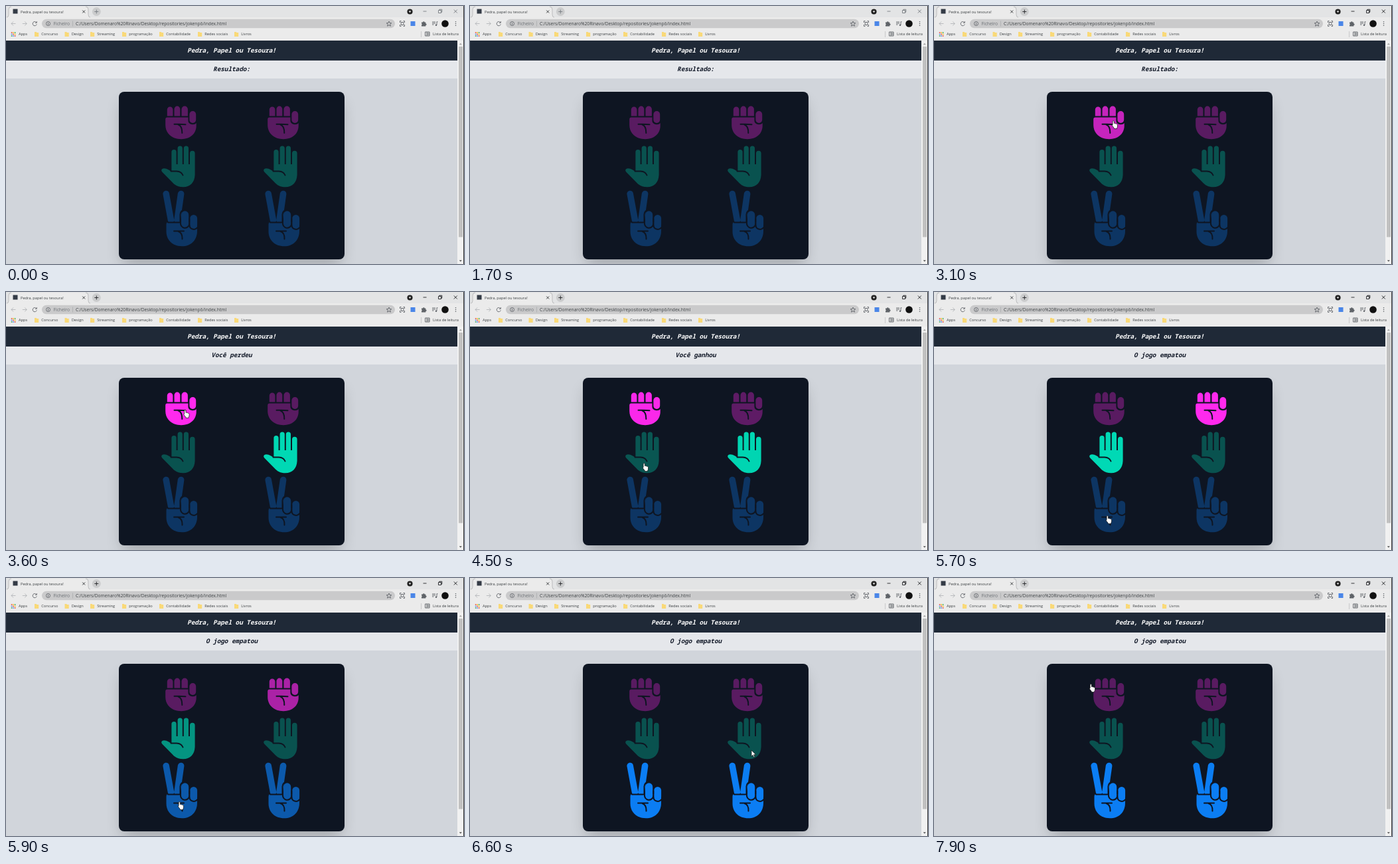
These frames come from a looping animation (690 by 388 pixels, 8 s). An HTML page:

```html
<!DOCTYPE html>
<html lang="pt">
<head>
<meta charset="utf-8">
<title>Pedra, papel ou tesoura!</title>
<style>
  html, body { margin: 0; width: 100%; height: 100%; overflow: hidden; background: #d1d5db; }
  svg { display: block; width: 100vw; height: 100vh; }
  .ui { font-family: "Open Sans", "Noto Sans", sans-serif; font-size: 5.7px; fill: #3c4043; }
  .url { font-size: 6.69px; }
  .mono { font: italic 600 9.3px "Noto Sans Mono", "DejaVu Sans Mono", monospace; text-anchor: middle; }
  .line { fill: none; stroke: #5f6368; stroke-width: .9; }
  .gap { fill: none; stroke: #0e1522; stroke-width: 2; stroke-linecap: round; stroke-linejoin: round; }
</style>
</head>
<body>
<svg viewBox="0 0 690 388" xmlns="http://www.w3.org/2000/svg">
  <defs>
    <filter id="blur" x="-20%" y="-25%" width="140%" height="150%"><feGaussianBlur stdDeviation="12.5"/></filter>
    <g id="rock">
      <path d="M242.800 165.500V155.700a4.300 4.300 0 0 1 8.600 0V165.500zM253.500 165.500V155a4.400 4.400 0 0 1 8.800 0V165.500zM264.500 165.500V155.200a4.700 4.700 0 0 1 9.400 0V165.500z"/>
      <rect x="276.400" y="158" width="9.800" height="18" rx="4.900"/>
      <path d="M243 167.500H274.400V172C274.400 176 277.500 178.200 281.200 178.200C283.600 178.200 285.500 177.500 286.700 176V180C286.700 192 277.500 200.200 264 200.200C250 200.200 240.200 191.500 240.200 179V170.500Q240.200 167.500 243 167.500z"/>
      <path class="gap" d="M253.500 177.700H260.500Q266.500 177.700 270.500 178.200M259.500 178.500Q265.500 180.500 265.300 191"/>
    </g>
    <g id="paper">
      <path d="M249.400 249V219.500a3.600 3.600 0 0 1 7.200 0V238h2V214a3.600 3.600 0 0 1 7.200 0V238h2V214a3.600 3.600 0 0 1 7.200 0V238h2V221.500a3.800 3.800 0 0 1 7.600 0V253C284.600 265 277.500 272.300 267 272.300C259 272.300 254.500 269.500 250 264.500L235.200 249.500C232.800 246.500 235 244 238.500 244.200C243 244.500 246 247 249.400 249z"/>
      <path class="gap" d="M248.500 248.500H257Q264.500 249 266.500 254.500"/>
    </g>
    <g id="peace">
      <path d="M241.200 282.500L248.500 322M263.600 282.500L258 322" fill="none" stroke="currentColor" stroke-width="9.600" stroke-linecap="round"/>
      <path d="M244 325H288V338C288 352.500 278.500 361.300 265 361.300C251 361.300 241.500 352 241.500 339V329Q241.500 325 244 325z"/>
      <path class="gap" d="M244 325.500H262.500V313.500a7 7 0 0 1 14 0V331"/>
      <rect x="264" y="308.300" width="11.200" height="22.500" rx="5.600"/>
      <path class="gap" d="M263 326a6.600 6.600 0 0 0 13.300 2"/>
      <rect x="277.300" y="314" width="10.800" height="20" rx="5.400"/>
      <path class="gap" d="M276.300 320V329.500a6.600 6.600 0 0 0 12 3.500M253 338.500H268M259.500 339Q266 341 265.500 350.500"/>
    </g>
    <path id="hand" d="M2.200.6Q3.400.6 3.400 1.800V4.500Q4.700 3.900 5.200 4.900Q6.500 4.500 6.900 5.400Q8.500 5.100 8.500 6.600V9Q8.500 10.500 7.600 11.300V12.600H3.300V11.500L.5 8Q-.3 6.600 1.100 6.700V1.800Q1.100.6 2.200.6z"/>
    <path id="arrow" d="M0 0V9.200L2.100 7.300L3.500 10.500L5 9.900L3.600 6.700H6.500z"/>
  </defs>

  <rect width="690" height="52" fill="#ebebeb"/>
  <rect width="690" height="17" fill="#e3e4e5"/>
  <path d="M0 17Q4 17 4 13V5Q4 1 8 1H120Q124 1 124 5V13Q124 17 128 17z" fill="#ebebeb"/>
  <path d="M1 17Q4 17 4 13V5Q4 1 8 1M120 1Q124 1 124 5V13Q124 17 127 17" fill="none" stroke="#a9abad" stroke-width=".7"/>
  <rect x="10.500" y="4.500" width="7" height="7" fill="#343b46"/>
  <text class="ui" x="22" y="10.600">Pedra, papel ou tesoura!</text>
  <path class="line" style="stroke:#2b2d30" d="M115.200 6.500l4 4m0-4l-4 4"/>
  <circle cx="136.300" cy="8.500" r="6.400" fill="#cbcccd"/>
  <g id="controls" fill="none" stroke-width=".9">
    <path d="M133.300 8.500h6m-3-3v6M628.500 8h5M651.500 6.500h4v4h-4zM652.800 6.500V5.200h4v4h-1.300M674.800 5.500l5 5m0-5l-5 5"/>
  </g>
  <circle cx="608.500" cy="8.500" r="4.100" fill="#222"/>
  <path d="M606.700 7.500h3.600l-1.800 2.600z" fill="#fff"/>

  <path class="line" d="M14.500 26.500H8m3-3l-3 3l3 3M24.800 26.500h6.500m-3-3l3 3l-3 3" style="stroke:#b4b6b9"/>
  <path class="line" d="M45.800 24.800a3.100 3.100 0 1 0 .5 2.600M46.300 23v2.300H44"/>
  <rect x="54" y="19.700" width="532" height="13.600" rx="6.800" fill="#cacacb"/>
  <circle class="line" cx="63.500" cy="26.500" r="3"/>
  <path class="line" d="M63.500 26v2.200m0-3.500v.7"/>
  <text class="ui url" x="71.500" y="28.800" style="fill:#6b6f74">Ficheiro</text>
  <path d="M100.500 22.500v8" stroke="#a8aaad" stroke-width=".7"/>
  <text class="ui url" x="105" y="28.800">C:/Users/Domenaro%20Rinavo/Desktop/repositories/jokenpô/index.html</text>
  <path class="line" d="M577 23l1.100 2.500 2.700.2-2.100 1.800.7 2.700-2.400-1.500-2.400 1.500.7-2.700-2.100-1.800 2.700-.2z"/>
  <path class="line" d="M593.500 25v-2.500h2m3 0h2V25m0 3v2.500h-2m-3 0h-2V28"/>
  <rect class="line" x="595.200" y="24.500" width="3.700" height="4"/>
  <rect x="609.500" y="23" width="7" height="7" fill="#4a86e8"/>
  <path d="M626 24.500h2a1.300 1.300 0 0 1 2.600 0h1.700v2a1.300 1.300 0 0 1 0 2.600v1.400H626v-2a1.200 1.200 0 0 0 0-2.200z" fill="#5f6368"/>
  <path class="line" d="M642 24h5m-5 2h5m-5 2h2.500m4.500-4.500v5m0-4.700h1.500"/>
  <circle cx="648" cy="28.700" r="1.200" fill="#5f6368"/>
  <circle cx="661.500" cy="26.500" r="5.300" fill="#111"/>
  <g fill="#5f6368"><circle cx="677.500" cy="23.800" r=".8"/><circle cx="677.500" cy="26.500" r=".8"/><circle cx="677.500" cy="29.200" r=".8"/></g>

  <g id="marks"></g>
  <path d="M625.500 38v9" stroke="#b9bbbe" stroke-width=".7"/>
  <path class="line" d="M631.500 39h6.500v6h-6.500zM634 39v6m0-4h4m-4 2h4"/>
  <text class="ui" x="643" y="44.100">Lista de leitura</text>

  <rect y="52" width="680" height="336" fill="#d1d5db"/>
  <rect y="52" width="680" height="30" fill="#1f2937"/>
  <rect y="82" width="680" height="27" fill="#e5e7eb"/>
  <text class="mono" x="340" y="70.200" fill="#fff">Pedra, Papel ou Tesoura!</text>
  <text class="mono" id="result" x="340" y="98" fill="#111827"></text>

  <rect x="176" y="147" width="328" height="240" fill="#000" opacity=".25" filter="url(#blur)"/>
  <rect x="170" y="129" width="340" height="252" rx="8" fill="#0e1522"/>
  <g id="board"></g>

  <rect x="680" y="52" width="10" height="336" fill="#f1f1f1"/>
  <rect x="682" y="61" width="6" height="286.500" fill="#c1c1c1"/>
  <path d="M682.800 58.200l2-2.400 2 2.400z" fill="#a3a3a3"/>
  <path d="M682.800 382.200l2 2.400 2-2.400z" fill="#505050"/>
  <rect x="689" width="1" height="388" fill="#3a3a3a"/>
  <use id="cursor" fill="#fff" stroke="#111" stroke-width=".7"/>
</svg>
<script>
const LOOP = 8000, FADE = 500, DIM = .31;
const $ = id => document.getElementById(id);

const folders = [[43, "Concurso"], [88.5, "Design"], [127, "Streaming"], [175, "programação"],
  [231, "Contabilidade"], [289, "Redes sociais"], [344, "Livros"]];
const dotColors = ["#ea4335", "#fbbc04", "#34a853", "#4285f4"];
let marks = '<text class="ui" x="19" y="44.1">Apps</text>';
for (let i = 0; i < 9; i++) {
  const x = 7.8 + i % 3 * 2.5, y = 39.2 + Math.floor(i / 3) * 2.5;
  marks += `<rect x="${x}" y="${y}" width="1.6" height="1.6" fill="${dotColors[i % 4]}"/>`;
}
for (const [x, name] of folders) {
  marks += `<path d="M${x} 39h2.600l1 1h2.600v6h-6.200z" fill="#f9d978"/>` +
    `<text class="ui" x="${x + 10.2}" y="44.1">${name}</text>`;
}
$("marks").innerHTML = marks;

const colors = { rock: "#ff29ed", paper: "#00d9b5", peace: "#0b7df3" };
// when each hand lights up and goes out
const picks = [
  ["rock", 0, 2890, 4450], ["paper", 0, 4450, 5725], ["peace", 0, 5725, 1e5],
  ["rock", 154, 4450, 5725], ["paper", 154, 3160, 4450], ["peace", 154, 5725, 1e5]
];
$("board").innerHTML = picks.map(([kind, dx]) =>
  `<g fill="${colors[kind]}" color="${colors[kind]}"><use href="#${kind}" x="${dx}"/></g>`).join("");
const hands = [...$("board").children];

const captions = [[0, "Resultado:"], [3160, "Você perdeu"], [4450, "Você ganhou"], [5690, "O jogo empatou"]];

// pointer tip: time, x, y
const path = [[2050, 345, 338], [2500, 269, 172], [3500, 269, 172], [4200, 261, 257], [5000, 261, 257],
  [5500, 260, 336], [6000, 260, 336], [6500, 438, 251], [6600, 424, 259], [6750, 424, 259],
  [7600, 288, 155], [7900, 235, 159], [8000, 235, 159]];

// cubic-bezier(.4, 0, .2, 1)
function ease(x) {
  if (x <= 0) return 0;
  if (x >= 1) return 1;
  let lo = 0, hi = 1, s = .5;
  for (let i = 0; i < 18; i++) {
    s = (lo + hi) / 2;
    const r = 1 - s;
    if (1.2 * r * r * s + .6 * r * s * s + s ** 3 < x) lo = s; else hi = s;
  }
  return s * s * (3 - 2 * s);
}

function pointer(t) {
  const i = path.findIndex(p => p[0] > t);
  if (i < 1) return null;
  const [t0, x0, y0] = path[i - 1], [t1, x1, y1] = path[i];
  let k = (t - t0) / (t1 - t0);
  k = k * k * (3 - 2 * k);
  return [x0 + (x1 - x0) * k, y0 + (y1 - y0) * k];
}

function draw(t) {
  picks.forEach(([, , on, off], i) => {
    const lit = ease((t - on) / FADE) - ease((t - off) / FADE);
    hands[i].setAttribute("opacity", DIM + (1 - DIM) * lit);
  });
  $("result").textContent = captions.filter(c => c[0] <= t).pop()[1];
  $("controls").setAttribute("stroke", t < 1800 ? "#777b80" : "#202124");

  const p = pointer(t), cursor = $("cursor");
  cursor.setAttribute("visibility", p ? "visible" : "hidden");
  if (p) {
    const overHand = p[0] > 230 && p[0] < 292;
    cursor.setAttribute("href", overHand ? "#hand" : "#arrow");
    cursor.setAttribute("transform", `translate(${p[0] - (overHand ? 1 : 0)} ${p[1]})`);
  }
}

const start = performance.now();
function tick() {
  draw((performance.now() - start) % LOOP);
  requestAnimationFrame(tick);
}
tick();
</script>
</body>
</html>
```
